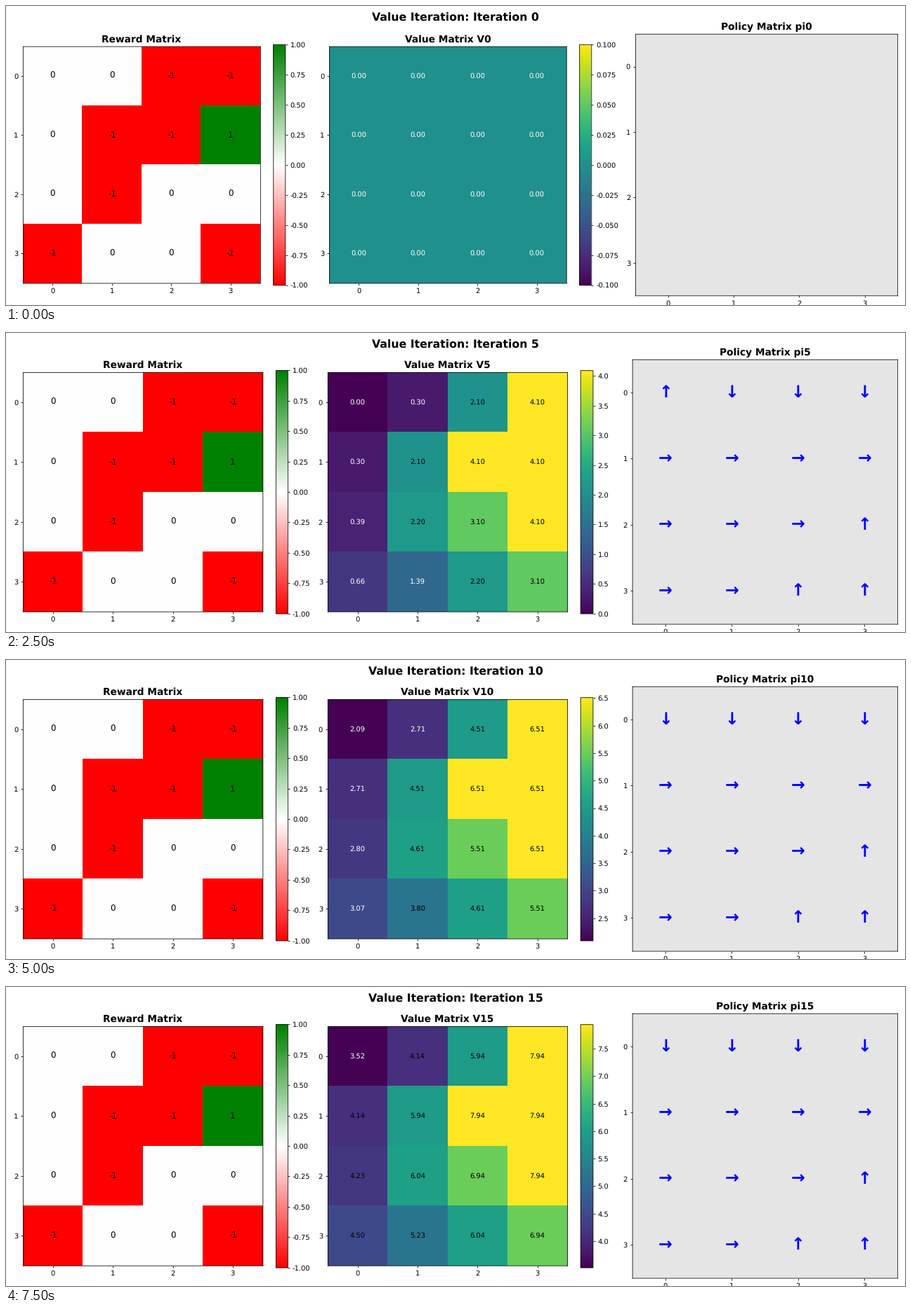
Write a matplotlib script that moves like this. It is 1280x427 px and loops after 8000 ms.

```python
import numpy as np
import matplotlib.pyplot as plt
from matplotlib.animation import FuncAnimation
from matplotlib.colors import LinearSegmentedColormap
from matplotlib.patheffects import Stroke

plt.rcParams.update({
    "font.family": "DejaVu Sans",
    "axes.unicode_minus": False,
    "text.hinting": "none",
    "path.snap": False,
})

W, H, DPI = 1280, 427, 640 / 9
STEPS, GAMMA, N = 16, 0.9, 4

# layout grid of 1800 x 600 units, 100 per inch
GRID_W, GRID_H = 1800, 600
LEFT, RIGHT, MID = 33.7, 1785, 318.8
HALF_UNIT = [Stroke(offset=(0.36, -0.36))]

REWARD = np.array([
    [0, 0, -1, -1],
    [0, -1, -1, 1],
    [0, -1, 0, 0],
    [-1, 0, 0, -1],
])
MOVES = [(-1, 0), (1, 0), (0, -1), (0, 1)]
ARROWS = "↑↓←→"
RED_GREEN = LinearSegmentedColormap.from_list("reward", ["red", "white", "green"])


def sweep(values):
    """One round of value iteration: new values and greedy actions."""
    q = np.zeros((len(MOVES), N, N))
    for a, (dr, dc) in enumerate(MOVES):
        for r, c in np.ndindex(N, N):
            # moves into a wall stay in place
            to = min(max(r + dr, 0), N - 1), min(max(c + dc, 0), N - 1)
            q[a, r, c] = REWARD[to] + GAMMA * values[to]
    return q.max(axis=0), q.argmax(axis=0)


history = [(np.zeros((N, N)), None)]
for _ in range(STEPS - 1):
    history.append(sweep(history[-1][0]))

# the tiny margin guards against the pixel size being truncated
fig = plt.figure(figsize=((W + 1e-6) / DPI, (H + 1e-6) / DPI), dpi=DPI)


def add_axes(x, w, h):
    """Axes centred on MID, edges on whole grid units."""
    edges = np.array([x, x + w, MID - h / 2, MID + h / 2])
    x0, x1, top, bottom = np.floor(edges + 0.5)
    ax = fig.add_axes([x0 / GRID_W, 1 - bottom / GRID_H,
                       (x1 - x0) / GRID_W, (bottom - top) / GRID_H])
    return ax


def label_cells(ax, label, color, **style):
    for r, c in np.ndindex(N, N):
        ax.text(c, r, label(r, c), color=color(r, c),
                ha="center", va="center", **style)


def style_axes(ax, title):
    ax.set_title(title, fontsize=14, fontweight="bold")
    ax.set_xticks(range(N))
    ax.set_yticks(range(N))
    ax.set_xlim(-0.5, N - 0.5)
    ax.set_ylim(N - 0.5, -0.5)
    for spine in ax.spines.values():
        spine.set_path_effects(HALF_UNIT)


def heatmap(x, slot, data, title, cmap, lo, hi):
    """Matrix image with its colorbar, sharing one slot of the row."""
    side, bar = 0.904 * slot, 0.046 * slot
    ax = add_axes(x, side, side)
    im = ax.imshow(data, cmap=cmap, vmin=lo, vmax=hi, aspect="auto")
    style_axes(ax, title)
    cbar = fig.colorbar(im, cax=add_axes(x + 0.954 * slot, bar, 20 * bar))
    cbar.outline.set_path_effects(HALF_UNIT)
    return ax


def draw(k):
    values, policy = history[k]
    slot = 530.8 if k else 525.3
    step = (RIGHT - LEFT - slot) / 2
    lo, hi = (values.min(), values.max()) if k else (-0.1, 0.1)

    fig.clear()
    fig.suptitle(f"Value Iteration: Iteration {k}", fontsize=16, fontweight="bold")

    ax = heatmap(LEFT, slot, REWARD, "Reward Matrix", RED_GREEN, -1, 1)
    label_cells(ax, lambda r, c: str(REWARD[r, c]),
                lambda r, c: "black", fontsize=12)

    ax = heatmap(LEFT + step, slot, values, f"Value Matrix V{k}", "viridis", lo, hi)
    half = values.max() / 2
    label_cells(ax, lambda r, c: f"{values[r, c]:.2f}",
                lambda r, c: "black" if values[r, c] > half else "white",
                fontsize=10)

    ax = add_axes(LEFT + 2 * step, slot, slot)
    ax.set_facecolor("#e5e5e5")
    style_axes(ax, f"Policy Matrix pi{k}")
    if policy is not None:
        label_cells(ax, lambda r, c: ARROWS[policy[r, c]],
                    lambda r, c: "blue", fontsize=24, fontweight="bold")
    return []


anim = FuncAnimation(fig, draw, frames=STEPS, interval=500,
                     repeat=True, repeat_delay=0, blit=False)
plt.show()
```
